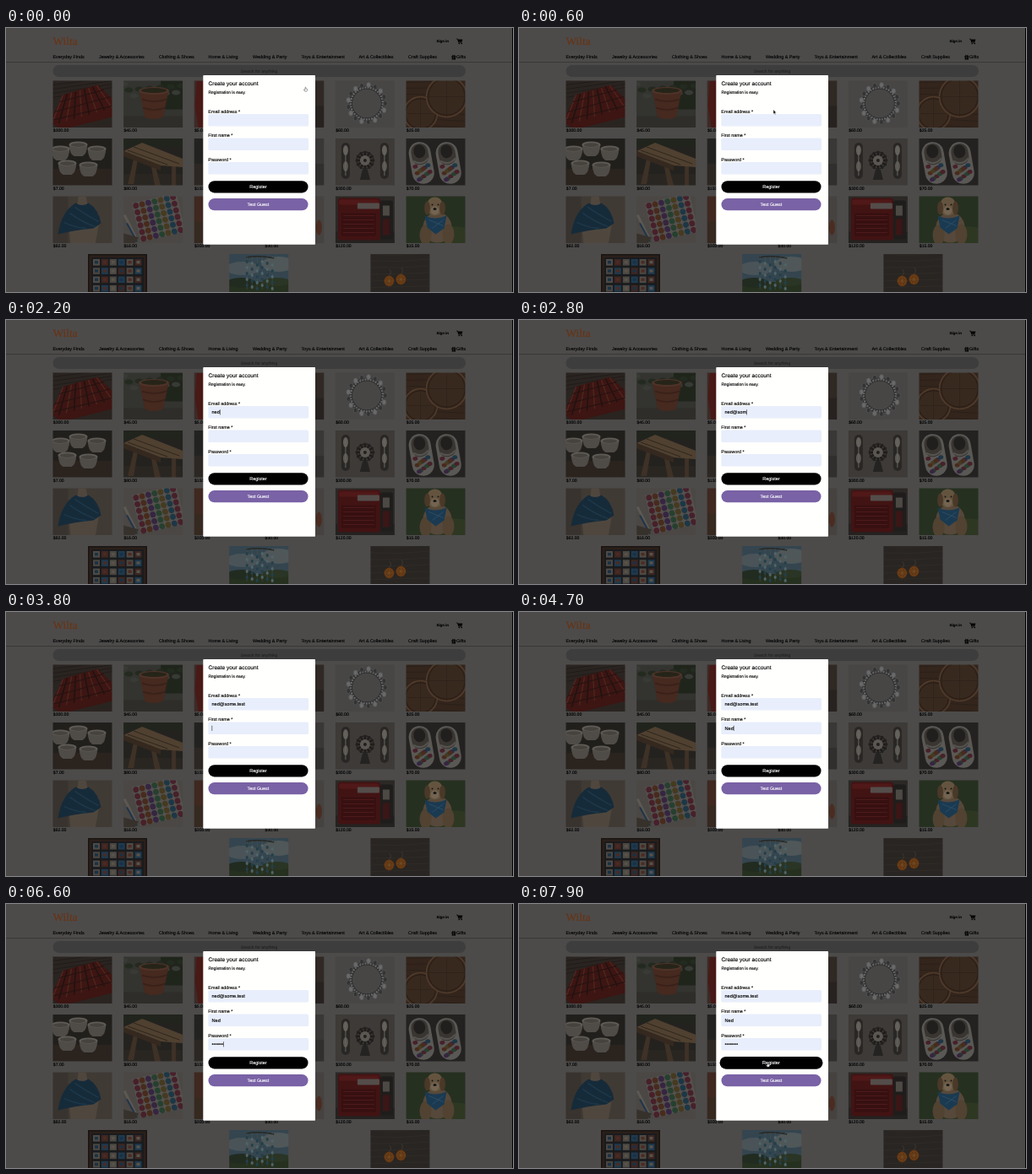
An HTML page that plays this animation: 600 px wide and 313 px high, repeating every 8000 ms.

```html
<!DOCTYPE html>
<html lang="en">
<head>
<meta charset="utf-8">
<title>Create your account</title>
<style>
html, body { margin: 0; width: 100%; height: 100%; overflow: hidden; background: #4c4b4a; }
svg { display: block; }
#stage { width: 100vw; height: 100vh; }
text { font-family: "Liberation Sans", Arial, sans-serif; text-rendering: geometricPrecision; white-space: pre; }
</style>
</head>
<body>
<svg id="stage" viewBox="0 0 600 313"></svg>
<script>
const stage = document.getElementById('stage');

// Markup helpers
const rect = (x, y, w, h, fill, r = 0, more = '') =>
  `<rect x="${x}" y="${y}" width="${w}" height="${h}" rx="${r}" fill="${fill}" ${more}/>`;
const oval = (x, y, rx, ry, fill, more = '') =>
  `<ellipse cx="${x}" cy="${y}" rx="${rx}" ry="${ry}" fill="${fill}" ${more}/>`;
const shape = (d, fill, more = '') => `<path d="${d}" fill="${fill}" ${more}/>`;
const line = (d, color, w = 1) => shape(d, 'none', `stroke="${color}" stroke-width="${w}"`);
const ring = (x, y, r, color, w = 1) => oval(x, y, r, r, 'none', `stroke="${color}" stroke-width="${w}"`);
const label = (x, y, s, size = 5.4, fill = '#000', more = '') =>
  `<text x="${x}" y="${y - .3}" font-size="${size}" fill="${fill}" stroke="${fill}" stroke-width=".13" ${more}>${s}</text>`;
const many = (n, fn) => Array.from({ length: n }, (_, i) => fn(i)).join('');
const back = fill => rect(-4, -4, 78, 64, fill);
const tile = (x, y, art) =>
  `<svg x="${x}" y="${y}" width="70" height="55.5"><g filter="url(#soft)">${art}</g></svg>`;

const paints = ['#47202a', '#1d3745', '#463a20', '#26402f', '#362542', '#482b1c'];

// Pictures, each 70 by 55.5
const rug = back('#2a2421') + many(5, i => line(`M0 ${i * 5}L70 ${i * 4 - 8}`, '#1f1a18', .8)) +
  shape('M13 16L53 5L75 26V42L10 58L-4 48Z', '#3d1512') +
  many(9, i => line(`M${12 + i * 5} ${17 - i * 1.4}L${-2 + i * 9} ${53 - i * 2.6}`, i % 2 ? '#1c1413' : '#4d2620', 1.4)) +
  line('M8 25L60 11M2 37L68 19M-2 47L74 29', '#241311', 1.2);

const pot = back('#33332f') + rect(0, 42, 70, 14, '#2e2d29') + rect(44, 0, 30, 34, '#20251c') +
  many(12, i => oval(i * 6.2, 4 + (i * 7) % 15, 5, 3, i % 2 ? '#232a1f' : '#383a35')) +
  shape('M19 13L25 43Q36 48 47 43L53 13Z', '#46291f') + oval(36, 12, 18, 4.5, '#4e3329') +
  oval(36, 11.5, 15, 3, '#262419') + line('M22 22Q36 27 51 22M23 32Q36 37 49 32', '#38211a', 1.4);

const bracelet = back('#474645') + ring(37, 27, 19, '#2b2b2b', 4) +
  `<circle cx="37" cy="27" r="19" fill="none" stroke="#666" stroke-width="2.4" stroke-dasharray="2 1.2"/>` +
  many(17, i => {
    const a = i * .37, x = 37 + 22 * Math.cos(a), y = 27 + 22 * Math.sin(a);
    return oval(x, y, 2.4, 3, i % 2 ? '#696969' : '#333', 'stroke="#585858" stroke-width=".7"');
  });

const hoops = back('#33251c') + many(8, i => line(`M0 ${i * 7 + 2}L70 ${i * 8}`, '#291f18', .8)) +
  [[17, 39, 20], [48, 19, 24]].map(([x, y, r]) =>
    oval(x, y, r, r, '#38291f') + ring(x, y, r, '#533d2c', 1.3) + ring(x, y, r - 2.3, '#241912', .8) +
    line(`M${x} ${y - r}V${y + r}M${x - r} ${y}H${x + r}`, '#2c2019', .6)).join('');

const bowls = back('#211f1c') + rect(0, 36, 70, 20, '#2a231e') +
  [[9, 12], [30, 7], [52, 12], [17, 29], [42, 31]].map(([x, y]) =>
    shape(`M${x - 11} ${y}q1 12 6 14h10q5 -2 6 -14z`, '#4f4b46') + oval(x, y, 11, 3.6, '#5f5b56') +
    oval(x, y + .6, 8.8, 2.3, '#46423d')).join('');

const table = back('#24221f') + rect(0, 0, 70, 10, '#20241d') + rect(0, 42, 70, 14, '#292622') +
  shape('M12 24h5L12 54H5ZM32 29h5L44 56H37ZM57 31h5V56H57Z', '#3e3126') +
  shape('M0 15L22 5L70 24V34L44 32Z', '#4f4030') + line('M5 14L52 31M12 10L66 30', '#2f261d', 1) +
  shape('M0 15L44 32V38L0 21Z', '#35291f');

const clock = back('#3d3a37') +
  [[12, 25], [58, 25]].map(([x, y]) => rect(x - 5, 5, 10, 43, '#292725', 5) +
    oval(x, 14, 3, 6, '#625f59') + oval(x, y + 8, 3, 6, '#5a5751') +
    line(`M${x} 10V44`, '#6a655e', 1)).join('') +
  many(12, i => oval(35, 18, 1.4, 3.5, '#1f1d1b', `transform="rotate(${i * 30} 35 26)"`)) +
  ring(35, 26, 10, '#242220', 1.4) + oval(35, 26, 6, 6, '#5a5651') + oval(35, 26, 2, 2, '#201f1d') +
  shape('M32 37h6l3 12H29Z', '#252321');

const shoe = (x, turn) => `<g transform="translate(${x} 28) rotate(${turn})">` +
  rect(-13, -24, 26, 50, '#5a5855', 13) + rect(-10, -22, 20, 25, '#393531', 9) + oval(0, -13, 7, 8, '#201f1e') +
  many(13, i => oval(-8 + (i * 7) % 17, 4 + (i * 5) % 17, 3, 2.4, paints[i % 6])) +
  line('M-9 -3Q0 5 9 -3', '#55534f', 2) + '</g>';
const shoes = back('#242221') + shoe(18, -10) + shoe(50, -10);

const shawl = back('#403a34') + rect(-4, 0, 22, 60, '#38332e') +
  shape('M30 0h9l2 10Q56 15 54 35L50 58H21L18 27Q16 15 29 10Z', '#4f473e') +
  shape('M27 8Q35 13 42 8Q54 15 57 32L48 38Q26 40 6 45Q10 18 27 8Z', '#162b3a') +
  line('M26 13Q39 22 54 30M20 20Q35 31 50 36M13 31Q26 37 39 38', '#1f3a4b', 1.3);

const watercolor = back('#4a4744') + `<g transform="rotate(-13 35 28)">` + rect(15, 3, 54, 47, '#54514e') +
  many(42, i => oval(19 + i % 7 * 7.5, 7 + Math.floor(i / 7) * 8, 3.4, 3.5, paints[(i * 5 + Math.floor(i / 7)) % 6])) +
  '</g>' + line('M1 22L14 48', '#5c5852', 3) + line('M4 32L16 54', '#20354a', 2) +
  shape('M0 44L18 49L13 56H0Z', '#37312c');

const cooler = back('#2b2825') + rect(0, 42, 70, 14, '#242220') + rect(3, 2, 50, 50, '#421313', 3) +
  rect(4, 4, 47, 6, '#501818', 2) + rect(26, 8, 26, 7, '#534d4a', 1) + rect(7, 20, 41, 27, '#371011', 1) +
  many(5, i => line(`M9 ${23 + i * 5}H46`, '#4e1a1a', 1)) + rect(53, 5, 15, 46, '#1f1d1c', 2) +
  rect(56, 11, 8, 12, '#4c4843') + rect(56, 27, 8, 19, '#3a1616');

const dog = back('#263020') + oval(56, 50, 36, 14, '#2d3722') +
  oval(37, 37, 17, 18, '#56483a') + oval(23, 46, 7, 12, '#514231') + oval(50, 45, 7, 12, '#514231') +
  oval(34, 12, 10, 11, '#64543f') + oval(25, 14, 3.4, 8, '#4a3828') + oval(43, 14, 3.4, 8, '#4a3828') +
  oval(34, 17, 5, 5, '#736451') + oval(34, 15, 2, 1.5, '#171615') + oval(31, 10, 1, 1, '#171615') +
  oval(38, 10, 1, 1, '#171615') +
  shape('M22 23Q34 29 48 23L45 38L35 45L25 37Z', '#1a3a52') + line('M27 28L44 35M31 38L44 28', '#345065', .8);

const quilt = back('#191512') + rect(1.5, 1.5, 67, 60, '#2b1f18') + rect(4, 4, 62, 58, '#191b1e') +
  many(30, i => {
    const x = 6 + i % 6 * 9.9, y = 6 + Math.floor(i / 6) * 10.3;
    return rect(x, y, 8, 7.6, ['#4e4a44', '#1f3a4e', '#4a4640', '#3f2621'][i * 3 % 4]) +
      rect(x + 2, y + 2, 4, 3.4, ['#1a3145', '#57524a', '#4c2a23'][i * 5 % 3]);
  });

const mobile = back('#34454f') + oval(16, 17, 20, 8, '#4a5458') + oval(58, 12, 20, 9, '#505759') +
  rect(-4, 33, 78, 30, '#26301f') + oval(14, 34, 17, 6, '#222b20') + oval(56, 33, 17, 5, '#2a3525') +
  line('M20 4Q36 1 53 5', '#282722', 1.4) +
  many(6, i => line(`M${21 + i * 6} 3V42`, '#4f5856', .4) +
    many(5, j => oval(21 + i * 6, 9 + j * 7 + i % 3 * 2, 1.6, 2.1, (i + j) % 2 ? '#4f6468' : '#22404a')));

const slice = (x, y) => line(`M${x} ${y - 14}Q${x + 4} ${y - 11} ${x} ${y - 6}`, '#453c34', .8) +
  oval(x, y, 6, 6.4, '#5c3312') + ring(x, y, 4.9, '#75461c', .8) +
  many(4, i => `<path d="M${x - 4.5} ${y}h9" stroke="#7b5328" stroke-width=".6" transform="rotate(${i * 45} ${x} ${y})"/>`);
const slices = back('#282522') + many(8, i => line(`M0 ${i * 8}Q36 ${i * 7 + 3} 70 ${i * 8 - 2}`, '#302b27', 1)) +
  slice(22, 32) + slice(36, 30);

const garment = back('#3b2b27') + shape('M3 0H14V56H5L1 30Z', '#481916');
const plain = (a, b) => back(a) + rect(-4, 30, 78, 30, b);
const earring = back('#454240') + oval(64, 37, 3.5, 9, '#4a2c20');

const columns = [55.5, 139.1, 222.7, 306.3, 389.9, 473.5];
const rows = [
  [62.5, [rug, pot, garment, plain('#2f2823', '#272220'), bracelet, hoops],
    ['$300.00', '$45.00', '$5.00', '', '$60.00', '$25.00']],
  [131, [bowls, table, plain('#222321', '#2c2723'), plain('#393837', '#302f2e'), clock, shoes],
    ['$7.00', '$80.00', '$150.00', '', '$300.00', '$70.00']],
  [199.5, [shawl, watercolor, plain('#3f2820', '#36291f'), earring, cooler, dog],
    ['$62.00', '$16.00', '$300.00', '$30.00', '$120.00', '$15.00']]
];

const menu = [[55.5, 'Everyday Finds'], [110, 'Jewelry &amp; Accessories'], [181, 'Clothing &amp; Shoes'],
  [239.5, 'Home &amp; Living'], [292, 'Wedding &amp; Party'], [349.5, 'Toys &amp; Entertainment'],
  [417.5, 'Art &amp; Collectibles'], [476, 'Craft Supplies'], [533, 'Gifts']];

const cart = line('M533 13h1.5l1.2 4.2h4', '#000', .8) + shape('M534.5 13.6h5.9l-.9 3h-4z', '#000') +
  oval(536.2, 18.5, .8, .8, '#000') + oval(539.2, 18.5, .8, .8, '#000');
const gift = rect(527.3, 33.3, 5.1, 1.6, '#000') + rect(527.7, 35.2, 4.3, 2.3, '#000') +
  line('M529.8 33Q527.8 31.2 528.5 33.2H531.2Q531.9 31.2 529.8 33', '#000', .6) + line('M529.8 33.3V37.5', '#4c4b4a', .5);

const page = '<filter id="soft"><feGaussianBlur stdDeviation=".6"/></filter>' + rect(0, 0, 600, 313, '#4c4b4a') +
  label(55.5, 20.5, 'Wilta', 13.4, '#6b3314', 'style="font-family:\'Liberation Serif\',Georgia,serif"') +
  label(509.5, 17.6, 'Sign in', 4.35, '#000', 'font-weight="700"') + cart +
  menu.map(([x, s]) => label(x, 36.4, s)).join('') + gift + rect(0, 40, 600, .8, '#353433') +
  rect(55.5, 44, 488.5, 14, '#3e3d3d', 7) + label(299.5, 53, 'Search for anything', 5, '#242424', 'text-anchor="middle"') +
  rows.map(([y, arts, prices]) => columns.map((x, i) =>
    tile(x, y, arts[i]) + label(x + .3, y + 60.8, prices[i], 5.1)).join('')).join('') +
  [quilt, mobile, slices].map((art, i) => tile(97 + i * 167.2, 268, art)).join('') +
  rect(599, 0, 1, 313, '#000');

const fields = [['Email address *', 102], ['First name *', 130.5], ['Password *', 159]];
const button = (y, s, fill) => rect(239.5, y, 118, 14.2, fill, 7.1) + label(298.4, y + 9.2, s, 5.4, '#fff', 'text-anchor="middle"');
const modal = rect(233.3, 56, 132.7, 200.7, '#fffffe', .8) +
  label(239.5, 68.3, 'Create your account', 6.55) + label(239.5, 78.7, 'Registration is easy.', 4.97) +
  fields.map(([s, y], i) => label(239.3, y - 1, s) + rect(239.3, y, 118.7, 14.6, '#e8eefb', 1.5) +
    label(243.5, y + 9.3, '', 5.6, '#000', `id="input${i}"`)).join('') +
  `<g id="register">${button(181.2, 'Register', '#000')}</g>` + button(202.1, 'Test Guest', '#7962a5');

const pointers = {
  hand: shape('M-.5 -2.1Q0 -2.7 .4 -2.1V-.6L2.1 0V1.3L1.4 2.6H-.8L-2.1 .6Q-1.6 0 -.5 .8Z', '#fff', 'stroke="#333" stroke-width=".45"'),
  arrow: shape('M0 -3V2.2L1.2 1.1L2 3L2.8 2.6L2 .8H3.6Z', '#111', 'stroke="#fff" stroke-width=".4"'),
  beam: line('M-.7 -2.2L0 -1.9L.7 -2.2M0 -1.9V1.9M-.7 2.2L0 1.9L.7 2.2', '#999', .4)
};

stage.innerHTML = page + modal + rect(0, 0, .55, 6.2, '#111', 0, 'id="caret"') + '<g id="pointer"></g>';
const [caret, pointer, register] = ['caret', 'pointer', 'register'].map(id => document.getElementById(id));
const inputs = fields.map((_, i) => document.getElementById('input' + i));

// Each entry: text, focus time, then one time per key
const typing = [
  ['ned@some.test', 900, [1200, 1300, 1800, 2300, 2500, 2600, 2800, 2900, 3000, 3100, 3200, 3300, 3400]],
  ['Ned', 3700, [4200, 4400, 4700]],
  ['••••••••', 5000, [5500, 5600, 5800, 5900, 6100, 6300, 6500, 6900]]
];

const progress = (t, a, b) => Math.min(1, Math.max(0, (t - a) / (b - a)));
const ease = p => p * p * (3 - 2 * p);
const mix = (a, b, p) => a + (b - a) * p;

function drawTyping(t) {
  let active = -1, last = 0;
  typing.forEach(([text, focus, keys], i) => {
    const count = keys.filter(k => k <= t).length;
    inputs[i].textContent = text.slice(0, count);
    if (t >= focus) [active, last] = [i, count ? keys[count - 1] : focus];
  });
  const on = active >= 0 && t < 7300 && (t - last) % 1000 < 500;
  caret.style.display = on ? '' : 'none';
  if (!on) return;
  caret.setAttribute('x', 243.6 + (inputs[active].textContent && inputs[active].getComputedTextLength()));
  caret.setAttribute('y', fields[active][1] + 4.2);
}

function drawPointer(t) {
  const returned = t >= 7300;
  const p = returned ? ease(progress(t, 7300, 7800)) : ease(progress(t, 50, 850));
  const x = returned ? mix(285, 294.5, p) : mix(354.5, 285, p);
  const y = returned ? mix(108, 190.5, p) : mix(72.5, 108, p);
  const overField = fields.some(([, top]) => y > top && y < top + 14.6);
  const kind = overField ? 'beam' : y > 181 || (!returned && p < .05) ? 'hand' : 'arrow';
  pointer.innerHTML = returned || t < 1700 ? pointers[kind] : '';
  pointer.setAttribute('transform', `translate(${x} ${y})`);
}

function draw(now) {
  const t = now % 8000;
  drawTyping(t);
  drawPointer(t);
  const grow = 1 + .033 * ease(progress(t, 7650, 7850));
  register.setAttribute('transform', `translate(298.5 188.3) scale(${grow}) translate(-298.5 -188.3)`);
}

const start = performance.now();
function loop() {
  draw(performance.now() - start);
  requestAnimationFrame(loop);
}
loop();
</script>
</body>
</html>
```
